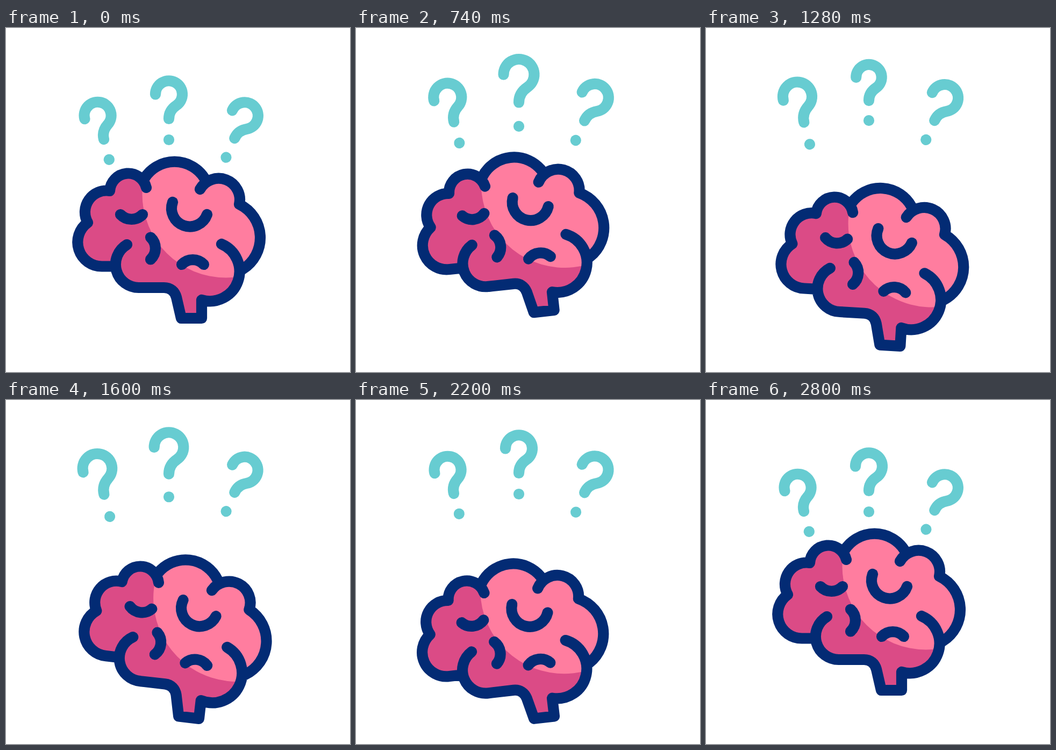
An HTML page for the animation above (3.42 s loop, 640x640 px).

```html
<!DOCTYPE html>
<html lang="en">
<head>
<meta charset="utf-8">
<title>Puzzled brain</title>
<style>
  html, body { margin: 0; width: 100%; height: 100%; overflow: hidden; background: #fff; }
  svg { display: block; width: 100vw; height: 100vh; }
  .line, .hook { fill: none; stroke-width: 20.2px; stroke-linecap: round; stroke-linejoin: round; }
  .line { stroke: #032b74; }
  .hook { stroke: #67ccd1; vector-effect: non-scaling-stroke; }
  .glow { stroke: #67ccd1; stroke-width: 22px; opacity: 0; }
  #tilt { transform-origin: 345px 496px; }
  .pulse { transform-origin: 0 28px; }
</style>
</head>
<body>
<svg viewBox="0 0 640 640">
  <defs>
    <clipPath id="inside"><path class="body"/></clipPath>
    <path id="question" class="hook" d="M-25 .5 A25 25 0 1 1 14 21 C5 27 0 35 0 46 M0 85h.01"/>
  </defs>

  <g id="marks">
    <g transform="translate(170.5 162.5) rotate(-14.5)"><use class="pulse" href="#question"/></g>
    <g transform="translate(303 123)"><use class="pulse" href="#question"/></g>
    <g transform="translate(444 163) rotate(24)"><use class="pulse" href="#question"/></g>
  </g>

  <g id="lift"><g id="tilt">
    <path class="body" fill="#db4b86"/>
    <circle cx="409" cy="309" r="155.5" fill="#ff7d9f" clip-path="url(#inside)"/>
    <path id="outline" class="line"/>
    <path class="line" d="M310 324 A34 34 0 0 0 374 347"/>
    <g id="folds"></g>
  </g></g>
</svg>
<script>
const LOOP = 3420;
const FIRM = 'cubic-bezier(.5, 0, .5, 1)';
const SOFT = 'cubic-bezier(.333, 0, .667, 1)';
const $ = s => document.querySelector(s);
const $$ = s => [...document.querySelectorAll(s)];

// The outline runs clockwise in four open strokes; joined, they make the fill
const strokes = [
  '203 443.5 H179 A45 45 0 0 1 152 362 A40 40 0 0 1 193 303 A34.5 34.5 0 0 1 261 297',
  '258 279 A66 66 0 0 1 369 279',
  '361 300 A39.5 39.5 0 0 1 434 328 A69 69 0 0 1 440 449',
  '401 402 A55.3 55.3 0 0 1 364 506 V540 H326 L317 501 C314 490 306 483 294 483 H248 A43 43 0 0 1 225 403'
];
$('#outline').setAttribute('d', strokes.map(s => 'M' + s).join(' '));
$$('.body').forEach(el => el.setAttribute('d', 'M' + strokes.join(' L') + 'Z'));

// Small folds, each with a lit copy on top; the later ones light up less often
const folds = [
  'M213 347 A28 28 0 0 0 254 347',
  'M327 440 A28 28 0 0 1 368 440',
  'M269 389.5 A28 28 0 0 1 269 430.5'
];
$('#folds').innerHTML = ['line', 'line glow']
  .map(c => folds.map(d => `<path class="${c}" d="${d}"/>`).join('')).join('');

// steps: [time in ms, value]
function play(el, prop, steps, easing, format = String) {
  const all = [[0, steps[0][1]], ...steps, [LOOP, steps.at(-1)[1]]];
  const frames = all.map(([t, v]) => ({ offset: t / LOOP, [prop]: format(v), easing }));
  el.animate(frames, { duration: LOOP, iterations: Infinity }).startTime = 0;
}

// From rest to one extreme, to the other, back to the first, and to rest
const wobble = (rest, a, b, first, half, lead, tail) => [
  [first - lead, rest],
  [first, a], [first + half, b], [first + 2 * half, a],
  [first + 2 * half + tail, rest]
];
const rise = y => `0 ${y}px`;
const turn = a => `${a}deg`;

play($('#lift'), 'translate', [[160, 0], [640, -15], [1310, 51], [2180, 51], [2680, 0]], FIRM, rise);
play($('#tilt'), 'rotate', wobble(0, -7, 7, 895, 610, 595, 495), FIRM, turn);
play($('#marks'), 'translate', [[160, 0], [480, -33], [2470, -33], [2800, 0]], FIRM, rise);

const firstBeat = [480, 780, 960];
$$('.pulse').forEach((el, i) =>
  play(el, 'scale', wobble(1, 1.145, .95, firstBeat[i], 495, 300, 320), SOFT));

const bursts = [800, 2300, 1720], glowTime = 320;
$$('.glow').forEach((el, i) => {
  const starts = bursts.slice(0, bursts.length - i).sort((a, b) => a - b);
  const steps = starts.flatMap(t => [[t, 1], [t + glowTime, 0]]);
  play(el, 'opacity', [[0, 0], ...steps], 'step-end');
});
</script>
</body>
</html>
```
